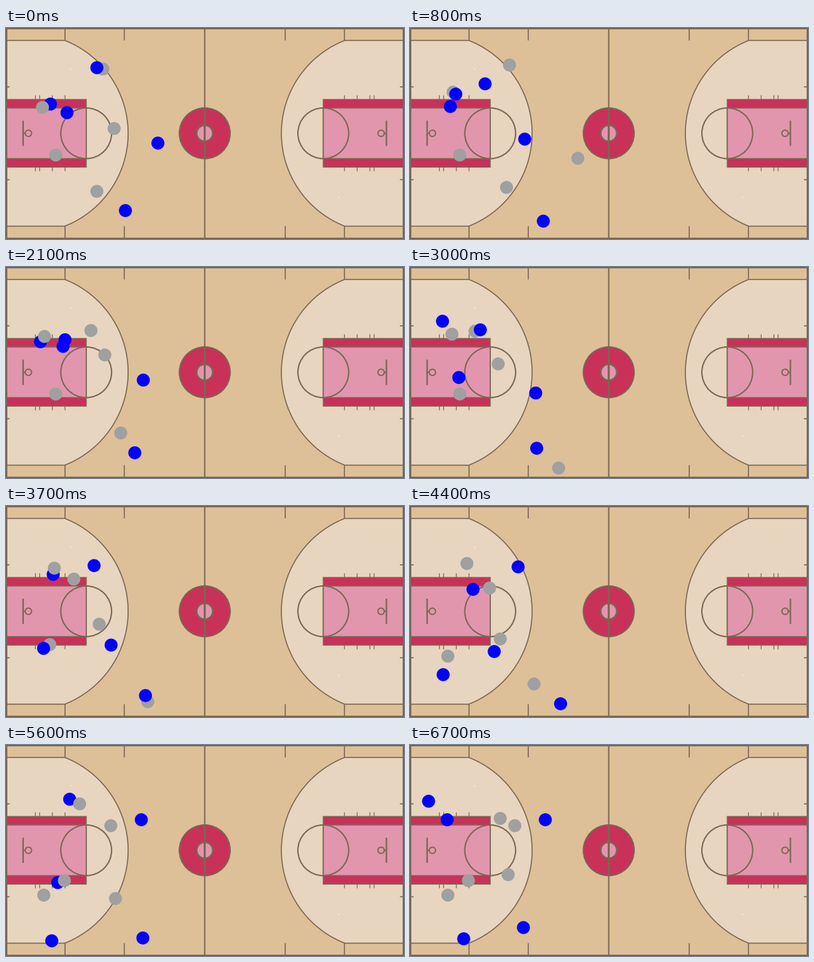
Recreate the animation shown at these times as a matplotlib script. Size 600 by 319 pixels, loop 6800 ms.

```python
import numpy as np
import matplotlib.pyplot as plt
from matplotlib.animation import FuncAnimation
from matplotlib.patches import Circle, Polygon, Rectangle

W, H, DPI = 600, 319, 100
FRAMES, STEP = 68, 100
PX = 72 / DPI

# The court is laid out in feet: 94 long, 50 wide
LENGTH = 94
FT = W / LENGTH
MID = 25
SHIFT = 0.06

FLOOR, INSIDE = "#ddc098", "#e7d5bf"
LINE, RED, PINK = "#7b6653", "#c93159", "#e196ad"
BLUE, GRAY = "#0000ff", "#a0a0a0"

plt.rcParams["path.snap"] = False
fig = plt.figure(figsize=(W / DPI, H / DPI), dpi=DPI, facecolor=FLOOR)
ax = fig.add_axes([0, 0, 1, 1])
ax.set(xlim=(SHIFT, LENGTH + SHIFT), ylim=(H / FT + SHIFT, SHIFT))
ax.axis("off")


def line(x0, y0, x1, y1, w=1.6):
    ax.plot([x0, x1], [y0, y1], color=LINE, lw=w * PX,
            solid_capstyle="butt", zorder=2)


def shape(points, fill, z=1):
    ax.add_patch(Polygon(points, fc=fill, ec=LINE, lw=1.6 * PX, zorder=z))


def ring(x, r, fill="none", w=2):
    ax.add_patch(Circle((x, MID), r, fc=fill, ec=LINE, lw=w * PX, zorder=2))


def half_court(flip):
    def fx(x):
        return LENGTH - x if flip else x

    def seg(x0, y0, x1, y1, w=1.6):
        line(fx(x0), MID + y0, fx(x1), MID + y1, w)

    # Three-point area: corner lines 22 ft from the axis, arc round the hoop
    hoop, r, corner = 5.25, 23.65, 22
    a = np.arcsin(corner / r)
    t = np.linspace(-a, a, 120)
    xs = np.r_[-1, hoop + r * np.cos(t), -1]
    ys = MID + np.r_[-corner, r * np.sin(t), corner]
    shape(np.c_[fx(xs), ys], INSIDE, 0.5)

    # Lane: the wide key in red, the narrow one in pink over it
    for half, fill in ((8, RED), (6, PINK)):
        shape([(fx(x), MID + y) for x, y in
               ((-1, -half), (19, -half), (19, half), (-1, half))], fill)
    ring(fx(19), 6)

    # Backboard and rim
    seg(4.1, -3, 4.1, 3, 2.2)
    seg(4.1, 0, 4.6, 0, 2)
    ring(fx(hoop + 0.1), 0.75, w=1.8)

    for side in (-1, 1):
        for x in (7, 8, 11, 14):
            seg(x, 8 * side, x, 9 * side, 1.2)
        for x in (14, 28):
            seg(x, 22 * side, x, 25.5 * side)
        seg(0, 11 * side, 0.9, 11 * side)


for flip in (False, True):
    half_court(flip)

ring(LENGTH / 2, 6, RED)
ring(LENGTH / 2, 1.9, PINK, 2.5)
line(LENGTH / 2, -1, LENGTH / 2, 51, 2)
line(LENGTH / 2, MID - 6, LENGTH / 2, MID + 6, 3)
ax.add_patch(Rectangle((0, 0), 1, 1, transform=ax.transAxes, fc="none",
                       ec=LINE, lw=4 * PX, zorder=2))
for x, y in ((98, 62.5), (502, 256.5)):
    ax.add_patch(Circle((x / FT, y / FT), 0.2, fc="#f1e6d6", lw=0, zorder=2))

# Turning points in pixels, back to front; "..." passes a key time by
KEYS = (0, 8, 21, 30, 44, 56, 67)
PLAYERS = [
    (BLUE, [(67, 115), ..., (52, 113), (49, 82), (95, 126), (96, 82), (28, 85)]),
    (BLUE, [(229, 174), (173, 168), (207, 171), ..., (127, 220), (78, 208), (56, 113)]),
    (GRAY, [(146, 62), (150, 56), (128, 96), (98, 97), (120, 124), (158, 122)]),
    (GRAY, [(55, 120), (65, 97), (58, 105), ..., ..., (111, 89), (136, 111)]),
    (GRAY, [(163, 152), (253, 197), (149, 133), ..., (136, 201), (88, 205)]),
    (GRAY, [..., ..., ..., (75, 192), (57, 227)]),
    (GRAY, [(137, 247), ..., (173, 251), (224, 304), (187, 269), ..., (148, 196)]),
    (BLUE, [(137, 60), ..., (89, 110), (106, 95), (163, 92), (204, 113)]),
    (BLUE, [(92, 128), (69, 100), (86, 120), ..., (50, 255), (69, 296), (81, 293)]),
    (BLUE, [(180, 276), (201, 292), ..., (191, 274), (227, 299), ..., (171, 276)]),
]


def glide(points):
    """Positions in every frame on a smooth cubic path, resting at its ends."""
    t, p = zip(*[(k, q) for k, q in zip(KEYS, points) if q is not ...])
    t, p = np.array(t), np.array(p, float)
    v = np.gradient(p, t, axis=0)
    f = np.clip(np.arange(FRAMES), t[0], t[-1])
    i = np.clip(np.searchsorted(t, f, side="right") - 1, 0, len(t) - 2)
    d = (t[i + 1] - t[i])[:, None]
    s = (f - t[i])[:, None] / d
    return ((1 + 2 * s) * (1 - s) ** 2 * p[i] + s * (1 - s) ** 2 * d * v[i]
            + s * s * (3 - 2 * s) * p[i + 1] + s * s * (s - 1) * d * v[i + 1])


dots, paths = [], []
for z, (color, points) in enumerate(PLAYERS):
    dots.append(ax.add_patch(Circle((0, 0), 9.8 / FT, fc=color, lw=0, zorder=5 + z)))
    paths.append(glide(points) / FT + SHIFT)


def update(f):
    for dot, path in zip(dots, paths):
        dot.center = path[f]
    return dots


anim = FuncAnimation(fig, update, frames=FRAMES, interval=STEP,
                     repeat=True, repeat_delay=0, blit=False)
plt.show()
```
